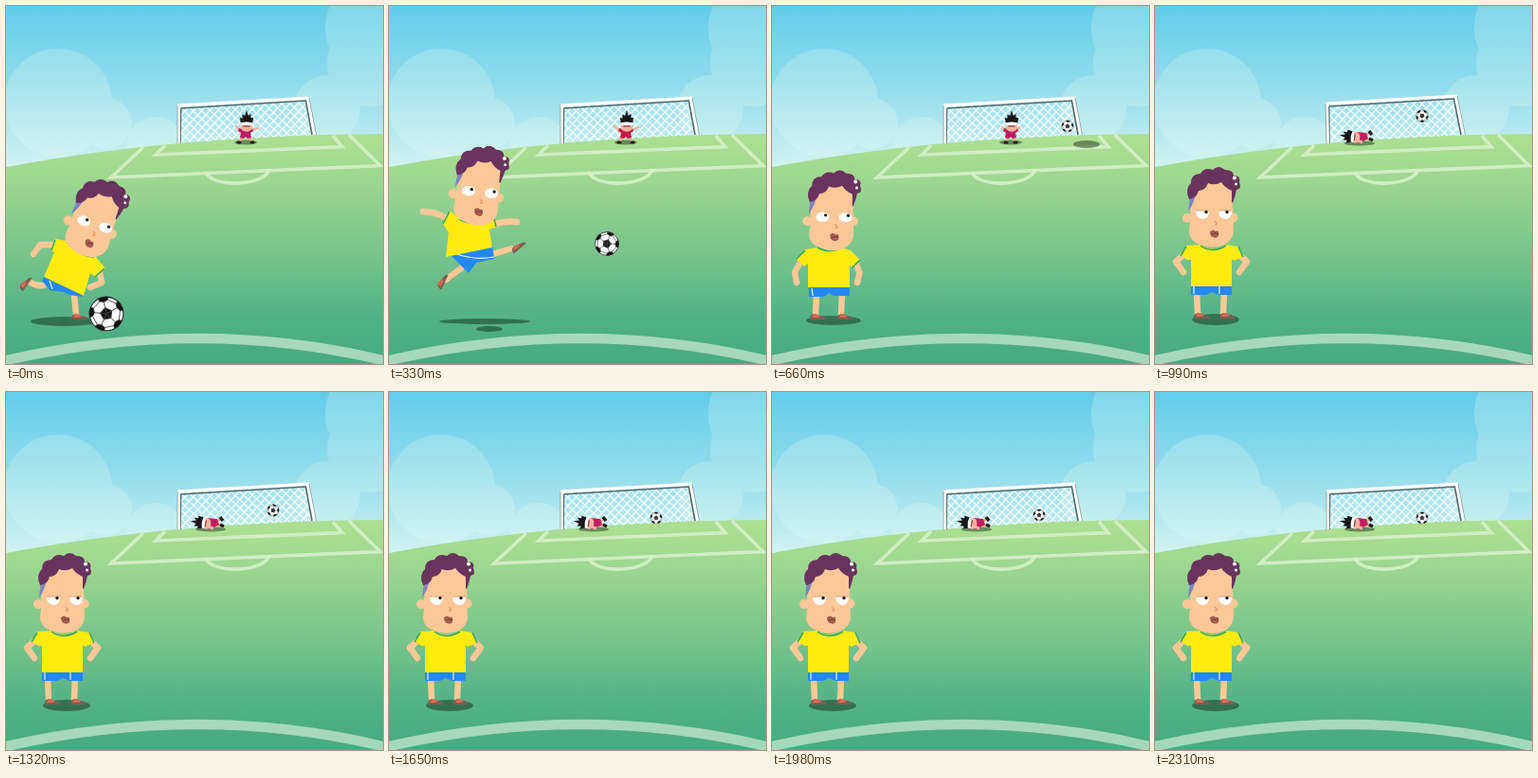
These frames come from a looping animation (398 by 378 pixels, 3300 ms). An HTML page:

```html
<!DOCTYPE html>
<html lang="en">
<head>
<meta charset="utf-8">
<title>Penalty kick</title>
<style>
html, body { margin: 0; width: 100%; height: 100%; overflow: hidden; }
svg { display: block; width: 398px; height: 378px; }
.limb { fill: none; stroke: #fcc897; stroke-width: 6.5; stroke-linecap: round; stroke-linejoin: round; }
.shirt { fill: #ffeb0f; }
.shorts { fill: #2488f5; }
.trim { fill: none; stroke: #36a65c; stroke-width: 1.5; }
.stripe { fill: none; stroke: #e8f5ff; stroke-width: 1.2; }
.shade { fill: #0c1a0c; fill-opacity: .43; }
.chalk { fill: none; stroke: #d9f2cb; stroke-opacity: .85; stroke-width: 3.6; }
</style>
</head>
<body>
<svg viewBox="0 0 398 378">
  <defs>
    <linearGradient id="sky" gradientUnits="userSpaceOnUse" x1="0" y1="0" x2="0" y2="168">
      <stop stop-color="#63cdea"/><stop offset=".5" stop-color="#92dcec"/><stop offset="1" stop-color="#d0f2f0"/>
    </linearGradient>
    <linearGradient id="cloud" gradientUnits="userSpaceOnUse" x1="0" y1="0" x2="0" y2="165">
      <stop stop-color="#83d7eb"/><stop offset=".4" stop-color="#9ee1ec"/><stop offset="1" stop-color="#d4f4f1"/>
    </linearGradient>
    <linearGradient id="grass" gradientUnits="userSpaceOnUse" x1="0" y1="135" x2="0" y2="378">
      <stop stop-color="#aee092"/><stop offset=".2" stop-color="#9ed790"/><stop offset=".55" stop-color="#74c28b"/>
      <stop offset=".82" stop-color="#50b086"/><stop offset="1" stop-color="#47aa83"/>
    </linearGradient>
    <pattern id="net" width="6.300" height="6.300" patternUnits="userSpaceOnUse" patternTransform="translate(184 106) rotate(43)">
      <path d="M0 0H6.300M0 0V6.300" stroke="#fff" stroke-width="2.400"/>
    </pattern>
    <clipPath id="round"><circle r="18"/></clipPath>
    <g id="ball">
      <circle r="18" fill="#fff"/>
      <g id="patches" clip-path="url(#round)" fill="#111" stroke="#444" stroke-width=".8"></g>
      <circle r="17.6" fill="none" stroke="#222" stroke-width="1.1"/>
    </g>
    <g id="head">
      <circle cx="-28" cy="4" r="5" fill="#fcc897"/>
      <circle cx="20.500" cy="3.500" r="5" fill="#fcc897"/>
      <path d="M-23-28Q-10-43 14-37Q21-30 20-12L21 18Q20 29 9 33Q-3 37-14 32Q-26 28-26 18Q-24 2-25-12Z" fill="#fcc897"/>
      <path d="M-27-3L-25-21-19-22Q-21-11-27-3Z" fill="#7f83bf"/>
      <path d="M-26-16Q-31-27-24-33Q-24-43-14-43Q-10-50-1-47Q5-53 12-47Q21-47 21-41Q29-41 27-34Q30-27 24-26Q23-20 20-12L19-13 19-25Q12-28 8-34Q1-30-6-33Q-9-25-16-25Q-18-17-26-16Z" fill="#6a335e"/>
      <path d="M20-38a2 2 0 1 0 4-1a2 2 0 1 0-4 1M22-32a1.500 1.500 0 1 0 3 0a1.500 1.500 0 1 0-3 0" fill="#fff"/>
      <path d="M1 7Q6 11 1 11" fill="none" stroke="#ee9c6e" stroke-width="1.600"/>
      <path d="M-4 18Q0 15 2 18Q6 16 5 23Q3 26-1 24Q-4 23-4 18Z" fill="#a75b50"/>
      <path d="M-2 21Q2 19 5 21" fill="none" stroke="#733d3d"/>
    </g>
    <g id="wide">
      <ellipse cx="-12" cy="-.5" rx="7" ry="5.300" fill="#fff"/>
      <ellipse cx="12" cy="-.5" rx="7" ry="5.300" fill="#fff"/>
      <circle cx="-9" cy="-2.500" r="1.700" fill="#222"/><circle cx="15" cy="-2.500" r="1.700" fill="#222"/>
    </g>
    <g id="sly">
      <path d="M-19-4H-5Q-5 5-12 5Q-19 4-19-4ZM5-4H19Q19 5 12 5Q5 4 5-4Z" fill="#fff"/>
      <path d="M-19-4H-5M5-4H19" stroke="#dda077" stroke-width="1.200"/>
      <circle cx="-8" cy="-2.500" r="1.700" fill="#222"/><circle cx="14" cy="-2.500" r="1.700" fill="#222"/>
    </g>
    <g id="shoe">
      <path d="M-8 3Q-8-3-3-3L3-1Q9 0 9 3Z" fill="#795f54"/>
      <path d="M-4-3L3-1 1 1-6 1Z" fill="#e0674e"/>
    </g>
    <g id="face">
      <path d="M-7-3L-8-9-5-8-5-13-2-11 0-18 2-11 5-14 5-9 8-9 7-3Z" fill="#171719"/>
      <ellipse cy="2" rx="7" ry="5.500" fill="#f5b3a0"/>
      <path d="M-6.500-3Q0-5 6.500-3V0H-6.500Z" fill="#fff"/>
      <path d="M-4 1H4" stroke="#7a3038" stroke-width="1.300"/>
    </g>
  </defs>

  <rect width="398" height="378" fill="url(#sky)"/>
  <g fill="url(#cloud)">
    <circle cx="55" cy="102" r="57"/><circle cx="106" cy="124" r="27"/><circle cx="158" cy="148" r="31"/>
    <circle cx="393" cy="23" r="56"/><circle cx="385" cy="60" r="46"/><circle cx="339" cy="108" r="35"/>
  </g>
  <path d="M0 170Q180 136 398 135V378H0Z" fill="url(#grass)"/>
  <g class="chalk">
    <path d="M145 149L111 181 395 168.500 362 136"/>
    <path d="M168 147L158 157 355 148.500 345 137"/>
    <path d="M211 175C216 193 275 190 278 172"/>
    <path d="M-4 375Q205 327 402 375" stroke="#bfe3cc" stroke-opacity=".8" stroke-width="10.500"/>
  </g>
  <g id="goal"></g>
  <g id="keeper"></g>
  <g id="player"></g>
  <g id="shot"></g>
</svg>
<script>
const el = id => document.getElementById(id);
const path = (kind, d) => `<path class="${kind}" d="${d}"/>`;
const limb = d => path('limb', d);
const shade = (x, y, rx, ry) => `<ellipse class="shade" cx="${x}" cy="${y}" rx="${rx}" ry="${ry}"/>`;
const use = (id, x, y, turn = 0, size = 1) =>
  `<use href="#${id}" transform="translate(${x} ${y}) rotate(${turn}) scale(${size})"/>`;
const head = (x, y, turn, eyes) => use('head', x, y, turn) + use(eyes, x, y, turn);

// Ball: a central pentagon, five rim patches and the seams between them
const polar = (r, a) => `${(r * Math.sin(a)).toFixed(1)} ${(-r * Math.cos(a)).toFixed(1)}`;
let patches = '';
for (let i = 0; i < 5; i++) {
  const a = i * Math.PI * 2 / 5;
  patches += `<path d="M0 0L${polar(6.5, a)} ${polar(6.5, a + Math.PI * 2 / 5)}Z"/>
    <path d="M${polar(12.5, a)}L${polar(14.5, a + .3)} ${polar(20, a + .3)} ${polar(20, a - .3)} ${polar(14.5, a - .3)}Z"/>
    <path d="M${polar(6.5, a)}L${polar(13, a)}M${polar(14.5, a + .3)}L${polar(14.5, a + .96)}"/>`;
}
el('patches').innerHTML = patches;

const goal = (x, y) => {
  const left = `${x} ${y}`, right = `${x + 136} ${y - 8}`;
  return `<path d="M${left}L${right} 323 136 184 144Z" fill="url(#net)"/>
    <path d="M${x + 2} ${y + 3}L${x + 134} ${y - 5}L323 136M184 145L${x + 2} ${y + 3}" fill="none" stroke="#59696d" stroke-width="1.6"/>
    <path d="M182.500 145L${left} ${right} 326 136" fill="none" stroke="#fff" stroke-width="3"/>
    <path d="M181 145L${x - 1.5} ${y}M${x + 137.5} ${y - 8}L327.500 136" stroke="#84979a" stroke-width=".8"/>`;
};

const keeper = (x, arms, spread, shirt) => {
  const line = (d, color, w) =>
    `<path d="${d}" fill="none" stroke="${color}" stroke-width="${w}" stroke-linecap="round" stroke-linejoin="round"/>`;
  return shade(x, 144, 12, 2.5) + `<g transform="translate(${x} 127)">` +
    line(`M-3 11L${-spread} 15M3 11L${spread} 15`, '#f0a898', 2.5) +
    line(`M${-spread} 17h-2M${spread} 17h2`, '#222', 3) +
    line(arms, '#f5b3a0', 2.5) +
    `<path d="M-7 2L0 4 7 2 8 5 5 7 6 12 2 13 0 11-2 13-6 12-5 7-8 5Z" fill="${shirt}"/></g>` +
    use('face', x + 1, 126, 0, .9);
};

const fallen = shade(216, 145, 16, 2.5) +
  `<path d="M222 137L227 134M222 140L227 141" stroke="#f0a898" stroke-width="3"/>
   <path d="M226 132L229 136M226 140L230 142" stroke="#222" stroke-width="3.500"/>
   <path d="M213 133L223 134 225 140 216 145 211 143Z" fill="#c31d61"/>
   <path d="M213 142L219 144" stroke="#f5b3a0" stroke-width="3"/>` + use('face', 210, 138.5, -82, .85);

const windUp = shade(62, 333, 36, 5) +
  limb('M43 294Q34 297 26 292') + use('shoe', 20, 293, -55) +
  limb('M72 305L74 326') + use('shoe', 77, 328) +
  limb('M50 252L36 252 29 262') + limb('M99 282L101 292 89 297') +
  path('shorts', 'M40 285L84 303 80 307 67 305 61 302 46 300 38 290Z') +
  path('stripe', 'M46 290L49 299') +
  path('shirt', 'M52 246L64 248Q78 264 94 264L105 277 94 286 89 282 82 306 40 286 51 260 47 258Z') +
  path('trim', 'M52 247L48 258M104 277L94 286M64 249Q76 264 93 265') +
  head(93.5, 231, 18, 'wide');

const leap = shade(101, 333, 48, 3) + shade(106, 341, 14, 3) +
  limb('M76 277L60 289') + use('shoe', 56, 291, -65) +
  limb('M106 263L129 256') + use('shoe', 136, 254, -40) +
  limb('M61 224Q48 217 36 217') + limb('M110 231Q124 226 135 228') +
  path('shorts', 'M64 262L109 252 111 267 92 271 84 282Z') +
  path('stripe', 'M69 261Q90 269 111 265') +
  path('shirt', 'M64 216L75 225Q86 231 98 226L111 225 113 233 106 236 109 255 60 265 63 239 57 230Z') +
  path('trim', 'M64 217L57 230M111 225L113 233M74 225Q86 232 99 226') +
  head(96, 197, 6, 'wide');

const landed = shade(65, 332, 29, 5) +
  limb('M47 304L46 325') + limb('M74 304L73 325') + use('shoe', 48, 328) + use('shoe', 77, 328) +
  limb('M30 270L24 281 26 292') + limb('M88 270L92.500 282 90 292') +
  path('shorts', 'M39 295H82V306H65L60 303 55 307H39Z') + path('stripe', 'M42 298L43 306') +
  path('shirt', 'M35 257L48 255Q60 261 74 255L83 258 93 268 84 277 82 273V297H38V272L34 275 26 267Z') +
  path('trim', 'M35 258L26 267M93 268L84 277M48 255Q60 262 74 255') +
  head(65.5, 223.5, 1, 'wide');

const proud = shade(64, 331, 25, 6) +
  limb('M44 302L45 324') + limb('M73 302L72 324') + use('shoe', 49, 327) + use('shoe', 76, 327) +
  limb('M31 262L22 270 30 281') + limb('M88 262L97 270 89 281') +
  path('shorts', 'M38 294H81V305H67L60 302 54 305H38Z') + path('stripe', 'M41 296V304M68 296V304') +
  path('shirt', 'M33 253L48 252Q60 261 75 252L88 254 93 265 83 269 81 267V296H38V268L34 268 27 263Z') +
  path('trim', 'M33 254L27 264M88 254L93 265M48 253Q60 262 75 253') +
  head(62, 220, 0, 'sly');

const ball = (x, y, r, turn) => use('ball', x, y, turn, r / 18);
const still = goal(182.5, 105), shaken = goal(181.5, 103);

// Each step: goal, keeper, player, ball
const steps = [
  [still, keeper(253, 'M-7 4L-10 0M7 4L13 2', 6, '#bf1b62'), windUp, ball(106, 325, 18.3, -12)],
  [still, keeper(250, 'M-7 4L-12 0M7 4L13 1', 6, '#c91b42'), leap, ball(230, 251, 12.7, 20)],
  [still, keeper(252, 'M-6 5L-9 1M6 5L9 1', 4, '#bf1b62'), landed, shade(332, 146, 14, 4) + ball(312, 127, 6.3, 5)],
  [shaken, fallen, proud, ball(282, 116, 6.5, 35)],
  [still, fallen, proud, ball(282, 125, 6.3, 15)],
  [still, fallen, proud, ball(282, 133, 6.2, 0)],
  [still, fallen, proud, ball(282, 130, 6.2, 0)],
  [still, fallen, proud, ball(282, 133, 6.2, 0)]
];
const layers = ['goal', 'keeper', 'player', 'shot'].map(el);
let shown = -1;

function draw(now) {
  const step = Math.min(7, Math.floor(now % 3300 / 330));
  if (step !== shown) {
    layers.forEach((layer, i) => layer.innerHTML = steps[step][i]);
    shown = step;
  }
  requestAnimationFrame(() => draw(performance.now()));
}
draw(performance.now());
</script>
</body>
</html>
```
